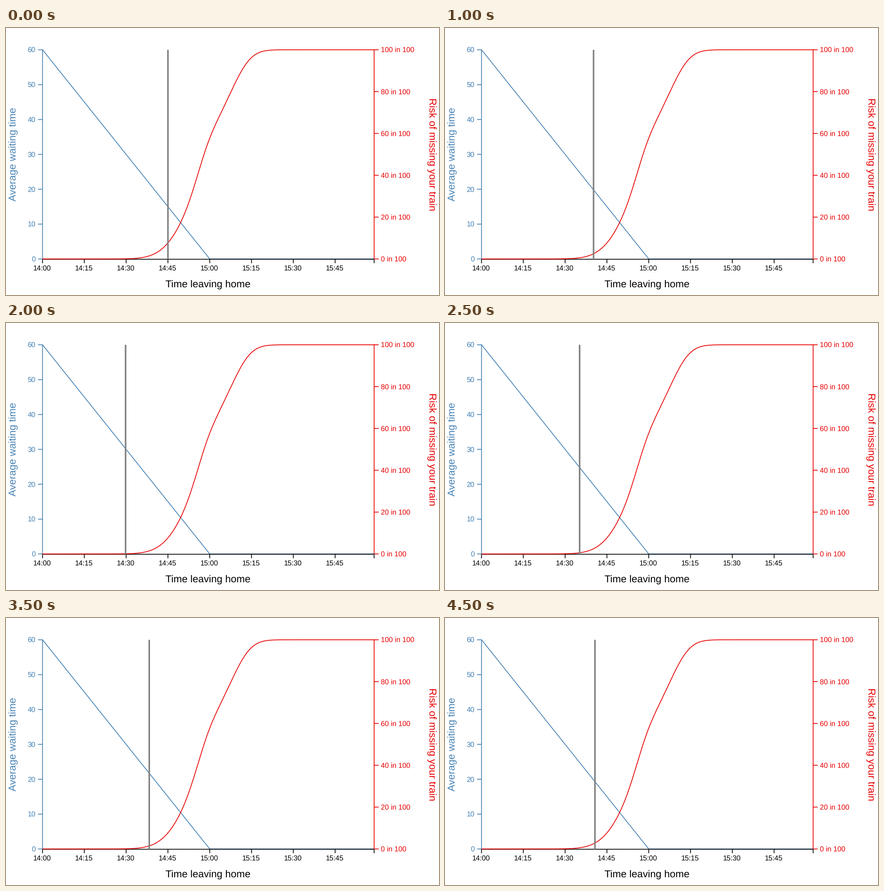
Recreate the animation shown at these times as a matplotlib script. Size 953 by 588 pixels, loop 6500 ms.

```python
from math import erf, sqrt

import numpy as np
import matplotlib
import matplotlib.pyplot as plt
from matplotlib.animation import FuncAnimation

matplotlib.rcParams["font.family"] = "Liberation Sans"
matplotlib.rcParams["text.hinting"] = "none"

W, H, DPI = 953, 588, 64
PT = 72 / DPI                       # points per pixel
BLUE, RED, GRAY = "#4682b4", "#e80000", "#808080"
TICK, TITLE, STROKE = 15.8, 22.2, 1.7
AXIS_Y, END = 509.3, 119            # time axis height, last minute shown

# Departure times tried, in minutes after 14:00; the marker rests on the last
TRIES = [45, 37, 40.2, 33.7, 29.8, 35.2, 37.6, 38.3, 39.7, 40.7]

fig = plt.figure(figsize=(W / DPI, H / DPI), dpi=DPI, facecolor="white")
ax = fig.add_axes([0, 0, 1, 1])
ax.set(xlim=(0, W), ylim=(H, 0))
ax.axis("off")


def time_x(minute):
    return 80.4 + minute * 368 / 60


def level_y(share):
    return 508.6 - share * 460.6


def normal_cdf(t, mean, sd):
    return (1 + erf((t - mean) / (sd * sqrt(2)))) / 2


def risk(t):
    """Chance of missing the train: a blend of three spreads of travel time."""
    return (0.59 * normal_cdf(t, 54, 8) + 0.13 * normal_cdf(t, 56.2, 3.5)
            + 0.28 * normal_cdf(t, 69.2, 5))


def line(x, y, color, width=STROKE, z=2):
    return ax.plot(x, y, color=color, lw=width * PT, zorder=z, snap=False,
                   solid_capstyle="butt", solid_joinstyle="miter")[0]


def label(x, y, text, size, color, ha="center", angle=0):
    ax.text(x, y, text, fontsize=size * PT, color=color, ha=ha,
            va="baseline", rotation=angle, rotation_mode="anchor")


def value_axis(x, tick_end, text_x, ha, color, values, form):
    """Vertical axis with its ticks and labels on one side."""
    line([x, x], [level_y(1) - STROKE / 2, level_y(0) + STROKE / 2], color)
    for v in values:
        y = level_y(v / values[-1])
        line([x, tick_end], [y, y], color)
        label(text_x, y + 5.3, form.format(v), TICK, color, ha)


left, right = time_x(0), time_x(END)

# Time axis
line([left, right], [AXIS_Y, AXIS_Y], "black", z=3.5)
for m in [*range(0, END, 15), END]:
    line([time_x(m)] * 2, [AXIS_Y, 518], "black", z=1)
    if m < END:
        label(time_x(m) - 0.6, 534.1, f"{14 + m // 60}:{m % 60:02d}", TICK, "black")
label(445, 571, "Time leaving home", TITLE, "black")

# Value axes
value_axis(left, 70.5, 65.2, "right", BLUE, range(0, 61, 10), "{}")
label(22.9, 278.3, "Average waiting time", TITLE, BLUE, angle=90)
value_axis(right, 820.3, 824.6, "left", RED, range(0, 101, 20), "{} in 100")
label(930.5, 278.3, "Risk of missing your train", TITLE, RED, angle=270)

# Curves
minutes = np.linspace(0, END, 239)
line(time_x(minutes), level_y(np.maximum(0, 1 - minutes / 60)), BLUE, z=3)
line(time_x(minutes), [level_y(risk(t)) for t in minutes], RED, z=4)

marker = line([left, left], [48, AXIS_Y], GRAY, width=3.4, z=5)


def update(i):
    x = time_x(TRIES[min(i, len(TRIES) - 1)])
    marker.set_xdata([x, x])
    return [marker]


anim = FuncAnimation(fig, update, frames=13, interval=500, repeat=True,
                     repeat_delay=0, blit=False)
plt.show()
```
